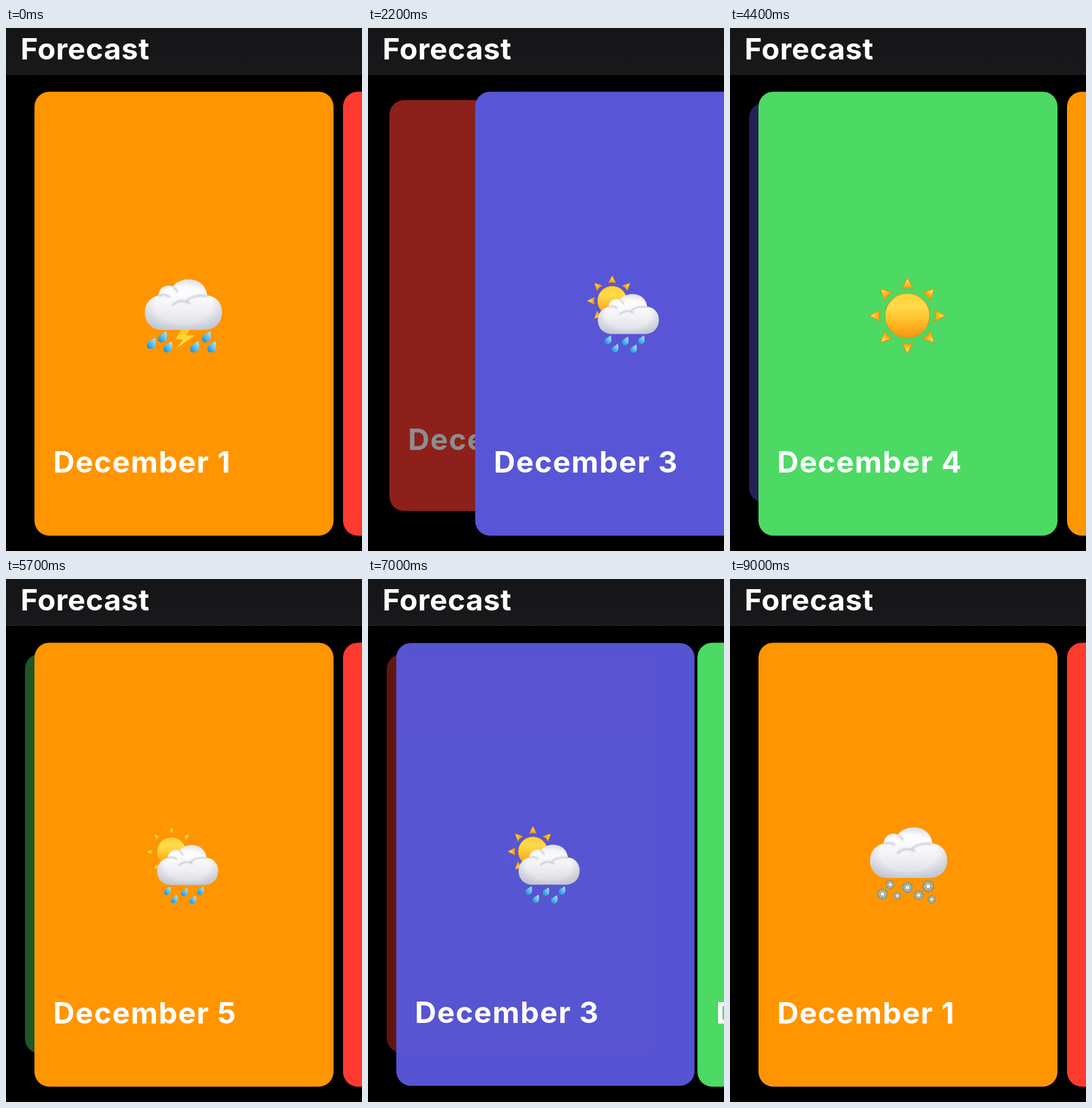
Animation, 600 px wide and 880 px high, one loop 9100 ms. Source, as an HTML page:

```html
<!DOCTYPE html>
<html lang="en">
<head>
<meta charset="utf-8">
<title>Forecast cards</title>
<style>
  html, body { margin: 0; width: 100%; height: 100%; overflow: hidden; background: #000; }
  svg { display: block; width: 100%; height: 100%; }
  text { font: 700 50px Inter, "Open Sans", sans-serif; fill: #fff; letter-spacing: .6px; }
  .date { letter-spacing: 1.4px; }
</style>
</head>
<body>
<svg viewBox="0 0 600 880" preserveAspectRatio="xMinYMin meet">
  <defs>
    <linearGradient id="cloudFill" x2="0" y2="1">
      <stop offset="0" stop-color="#f6f6f9"/>
      <stop offset=".25" stop-color="#fdfdfe"/>
      <stop offset=".55" stop-color="#f3f3f7"/>
      <stop offset=".85" stop-color="#e2e3e9"/>
      <stop offset="1" stop-color="#cfd4dd"/>
    </linearGradient>
    <radialGradient id="cloudEdge" cx=".5" cy=".5" r=".56">
      <stop offset=".65" stop-color="#b9bdca" stop-opacity="0"/>
      <stop offset="1" stop-color="#b9bdca" stop-opacity=".6"/>
    </radialGradient>
    <linearGradient id="sunFill" x2="0" y2="1">
      <stop offset="0" stop-color="#ffcf3a"/>
      <stop offset=".3" stop-color="#ffdb4c"/>
      <stop offset=".6" stop-color="#ffc02a"/>
      <stop offset="1" stop-color="#f8930f"/>
    </linearGradient>
    <linearGradient id="dropFill" x1="1" x2="0" y2="1">
      <stop offset="0" stop-color="#c3ecfb"/>
      <stop offset=".45" stop-color="#62c3f0"/>
      <stop offset="1" stop-color="#0c84d4"/>
    </linearGradient>
    <linearGradient id="boltFill" x2="0" y2="1">
      <stop offset="0" stop-color="#ffc21c"/>
      <stop offset="1" stop-color="#ffe94f"/>
    </linearGradient>
    <linearGradient id="barFill" x2="0" y2="1">
      <stop offset="0" stop-color="#161518"/>
      <stop offset="1" stop-color="#19181b"/>
    </linearGradient>
    <filter id="soft" x="-20%" y="-50%" width="140%" height="200%"><feGaussianBlur stdDeviation="1.5"/></filter>

    <path id="cloudShape" d="M264 508C246 508 234 495 234 479C234 463 244 453 257 450C257 437 270 430 281 435C288 426 298 423 308 423C326 423 338 435 339 450C354 451 364 463 364 478C364 496 351 508 334 508Z"/>
    <g id="cloud">
      <use href="#cloudShape" fill="url(#cloudFill)"/>
      <use href="#cloudShape" fill="url(#cloudEdge)"/>
      <g fill="none" stroke="#c6c9d2" stroke-width="3" filter="url(#soft)">
        <path d="M280 467C288 458 301 457 310 464"/>
        <path d="M304 460C312 451 326 449 339 451"/>
        <path d="M257 451C264 448 271 449 276 453"/>
        <path d="M281 436C285 438 288 441 289 445"/>
      </g>
    </g>
    <path id="drop" fill="url(#dropFill)" d="M6-10C8-2 9 8-1 9C-9 9-9 1-5-3Z"/>
    <g id="flake">
      <g id="flakeArms" stroke="#7f9a9a" stroke-width="2.6" stroke-linecap="round"></g>
      <circle r="5.4" fill="none" stroke="#a9c2bf" stroke-width="2"/>
      <circle r="3" fill="#f4fbff"/>
    </g>
    <g id="sun" fill="url(#sunFill)" stroke="#e6920f" stroke-width="1.2">
      <g id="rays"></g>
      <circle r="37.5"/>
    </g>
  </defs>
  <rect width="600" height="880"/>
  <g id="deck"></g>
  <rect width="600" height="79" fill="url(#barFill)"/>
  <rect y="78" width="600" height="1" fill="#222125"/>
  <text x="24.5" y="52.5">Forecast</text>
</svg>
<script>
const LOOP = 9100, STEP = 100;
const PITCH = 520;
const COLORS = ["#ff9500", "#ff3b30", "#5856d6", "#4cd964"];

// [start ms, duration ms, direction]
const SWIPES = [
  [253, 900, 1], [1714, 900, 1], [3165, 900, 1], [4600, 900, 1],
  [5780, 650, -1], [6435, 700, -1], [7270, 700, -1], [8080, 700, -1]
];

const byId = id => document.getElementById(id);
const use = (id, x, y, scale = 1) =>
  `<use href="#${id}" transform="translate(${x} ${y}) scale(${scale})"/>`;
const scatter = (id, places, scale) =>
  places.map(([x, y, s = scale]) => use(id, x, y, s)).join("");
const turns = (count, shape) =>
  Array.from({ length: count }, (_, i) => `<g transform="rotate(${i * 360 / count})">${shape}</g>`).join("");

byId("rays").innerHTML = turns(8, '<path d="M0-64L9-45.5Q0-49-9-45.5Z"/>');
byId("flakeArms").innerHTML = turns(6, '<path d="M0 0V-8M-2.5-7.5H2.5"/>');

const ICONS = {
  sun: use("sun", 299, 484),
  storm:
    '<path fill="url(#boltFill)" stroke="#f0b414" d="M296 506L312 505L304 517L319 517L286 540L298 525L286 523Z"/>' +
    scatter("drop", [[245, 531], [264, 520], [273, 537], [318, 537], [338, 520], [347, 537]], 1) +
    use("cloud", 0, 0),
  snow:
    scatter("flake", [[257, 530, 1], [270, 514, .85], [282, 533, .75], [299, 519, 1],
      [318, 532, .9], [334, 517, 1.1], [340, 539, .75]]) +
    use("cloud", 2, -5),
  sunRain:
    use("sun", 279, 459, .66) +
    scatter("drop", [[272, 525], [284, 539], [301, 527], [315, 540], [328, 525]], .75) +
    use("cloud", 70, 113.5, .79)
};

function makeCard(icon, index) {
  const card = document.createElementNS("http://www.w3.org/2000/svg", "g");
  card.innerHTML =
    `<rect rx="25" fill="${COLORS[index % 4]}"/><g>${ICONS[icon]}</g>` +
    `<text class="date">December ${index + 1}</text>`;
  byId("deck").append(card);
  const [rect, art, label] = card.children;
  return { card, rect, art, label };
}

const cards = ["storm", "sunRain", "sunRain", "sun", "sunRain", "sunRain"].map(makeCard);

function setAll(node, values) {
  for (const key in values) node.setAttribute(key, values[key]);
}

const clamp = v => Math.min(1, Math.max(0, v));
const glide = u => 1 - (1 - u) ** 3 * (1 + 3 * u);
const scrollAt = t => SWIPES.reduce(
  (sum, [start, duration, way]) => sum + way * glide(clamp((t - start) / duration)), 0);

// Cards ahead slide in; cards passed shrink, rise and fade behind.
function placeCard({ card, rect, art, label }, offset) {
  const passed = Math.max(0, offset);
  const ahead = Math.max(0, -offset) * PITCH;
  const alpha = clamp(1 - .6 * passed);
  const hidden = alpha === 0 || ahead > 600;
  card.style.display = hidden ? "none" : "";
  if (hidden) return;
  card.setAttribute("opacity", alpha);
  const x = ahead - 16 * passed;
  const scale = 1 - .1 * passed;
  setAll(rect, { x: 48 + x, y: 107.2 + 19 * passed, width: 504 * scale, height: 747 * scale });
  setAll(label, { x: 79.5 + x, y: 747.8 - 51 * passed });
  art.setAttribute("transform", `translate(${ahead - 41 * passed} ${-19 * passed})`);
}

let firstIcon = "storm";
function render(t) {
  const icon = t < 4000 ? "storm" : "snow";
  if (icon !== firstIcon) cards[0].art.innerHTML = ICONS[firstIcon = icon];
  const scroll = scrollAt(t);
  cards.forEach((card, i) => placeCard(card, scroll - i));
}

const began = performance.now();
function tick() {
  const t = (performance.now() - began) % LOOP;
  render(Math.floor(t / STEP) * STEP);
  requestAnimationFrame(tick);
}
render(0);
requestAnimationFrame(tick);
</script>
</body>
</html>
```
